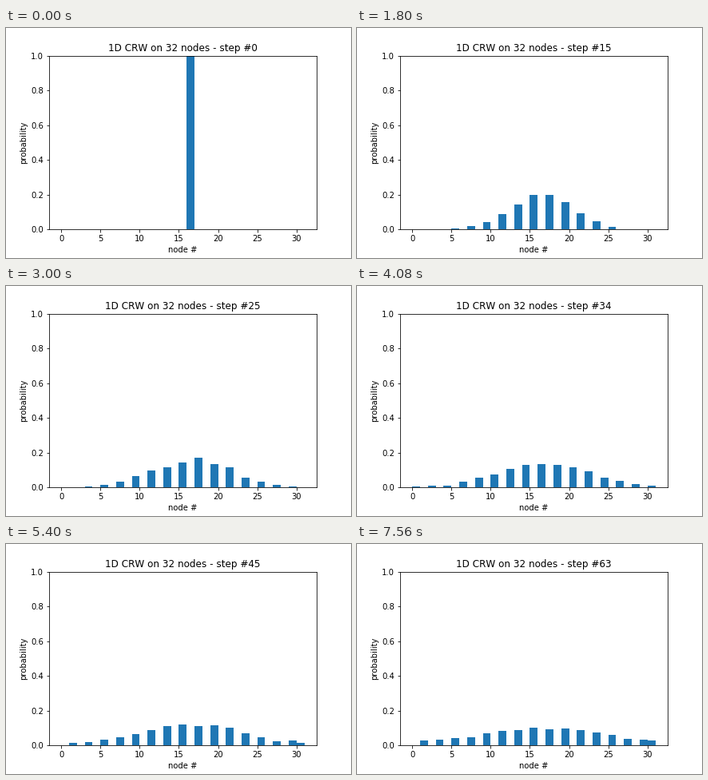
Animation of 432x288 px, one loop 7680 ms. Source, as a matplotlib script:

```python
import numpy as np
import matplotlib.pyplot as plt
from matplotlib.animation import FuncAnimation

NODES = 32
STEPS = 64
WALKERS = 2000
INTERVAL = 120


def histogram(pos):
    """Share of walkers per bin; the last bin holds the two last nodes."""
    bins = np.minimum(pos, NODES - 2)
    return np.bincount(bins, minlength=NODES - 1) / pos.size


def walk():
    """Histograms of a seeded classical random walk on a ring of nodes."""
    rng = np.random.default_rng(7)
    moves = rng.choice([-1, 1], size=(STEPS, WALKERS))
    moves[0] = NODES // 2
    return [histogram(pos) for pos in moves.cumsum(axis=0) % NODES]


shares = walk()

plt.rcParams["font.family"] = "DejaVu Sans"
plt.rcParams["font.size"] = 10
plt.rcParams["text.kerning_factor"] = 6
fig, ax = plt.subplots(figsize=(6, 4), dpi=72)
fig.subplots_adjust(left=0.125, right=0.9, bottom=0.125, top=0.88)

bars = ax.bar(np.arange(NODES - 1), shares[0], width=1, align="edge",
              color="#1f77b4")
margin = 0.05 * (NODES - 1)
ax.set_xlim(-margin, NODES - 1 + margin)
ax.set_ylim(0, 1)
ax.set_xticks(range(0, NODES, 5))
ax.set_xlabel("node #")
ax.set_ylabel("probability")
title = ax.set_title("", fontsize=12)


def draw(step):
    for bar, share in zip(bars, shares[step]):
        bar.set_height(share)
    title.set_text(f"1D CRW on {NODES} nodes - step #{step}")
    return [*bars, title]


anim = FuncAnimation(fig, draw, frames=STEPS, interval=INTERVAL,
                     repeat=True, repeat_delay=0)
plt.show()
```
